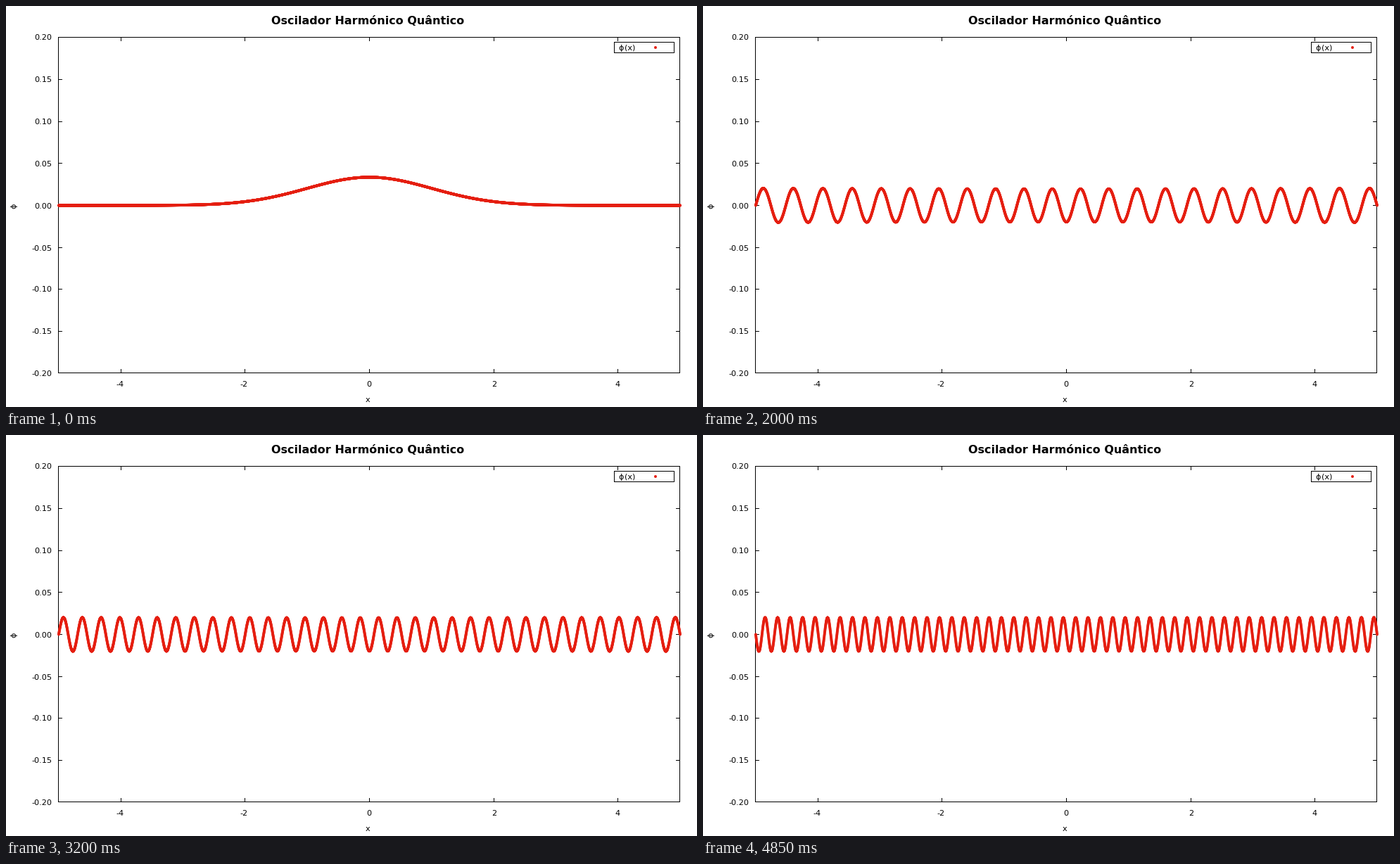
These frames come from a looping animation (982x570 px, 4900 ms). A matplotlib script:

```python
import numpy as np
import matplotlib.pyplot as plt
from matplotlib.animation import FuncAnimation
from matplotlib.patches import Rectangle

W, H, DPI = 982, 570, 64
LEFT, RIGHT, TOP, BOTTOM = 74.95, 957.95, 44.95, 521.95
FRAMES, STEP_MS = 98, 50
RED = (229, 30, 16)
DOT_RADIUS = 1.95
X_MAX, Y_MAX = 5, 0.2


def to_px(x):
    return LEFT + (RIGHT - LEFT) * (x + X_MAX) / (2 * X_MAX)


def to_py(y):
    return BOTTOM - (BOTTOM - TOP) * (y + Y_MAX) / (2 * Y_MAX)


def oscillator_states(points=5001, basis=180):
    """Eigenstates of the harmonic oscillator between hard walls."""
    x = np.linspace(-X_MAX, X_MAX, points)
    dx = x[1] - x[0]
    k = np.arange(1, basis + 1) * np.pi / (2 * X_MAX)
    sines = np.sin(np.outer(k, x + X_MAX)) / np.sqrt(X_MAX)
    energy = np.diag(k**2 / 2) + (sines * x**2 / 2) @ sines.T * dx
    _, vectors = np.linalg.eigh(energy)
    phi = vectors.T @ sines * np.sqrt(dx)
    # Start every state upwards at the left wall, using the slope there.
    phi *= np.sign(vectors.T @ k)[:, None]
    return x, phi


x, phi = oscillator_states()
px = to_px(x)

fig = plt.figure(figsize=(W / DPI, H / DPI), dpi=DPI, facecolor="white")
ax = fig.add_axes([0, 0, 1, 1])
ax.set_xlim(0, W)
ax.set_ylim(H, 0)
ax.axis("off")


def bar(x0, y0, w, h):
    ax.add_patch(Rectangle((x0, y0), w, h, fc="black", lw=0, antialiased=False))


def outline(x0, y0, x1, y1):
    for y in (y0, y1):
        bar(x0, y, x1 - x0 + 1, 1)
    for xx in (x0, x1):
        bar(xx, y0, 1, y1 - y0 + 1)


def label(x0, y0, text, size=11.2, ha="center", va="baseline", **kw):
    ax.text(x0, y0, text, fontsize=size * 72 / DPI, family="DejaVu Sans",
            ha=ha, va=va, color="black", **kw)


left, right, top, bottom = (int(v) for v in (LEFT, RIGHT, TOP, BOTTOM))
outline(left, top, right, bottom)
for v in range(-4, 5, 2):
    tx = int(to_px(v))
    bar(tx, top, 1, 6)
    bar(tx, bottom - 5, 1, 6)
    label(tx + (-0.5 if v < 0 else 0.3), 541, str(v))
for i in range(-4, 5):
    v = i * 0.05
    ty = int(to_py(v))
    bar(left, ty, 6, 1)
    bar(right - 5, ty, 6, 1)
    label(65, ty + 4.5, f"{v:.2f}", ha="right")

label(514.5, 26, "Oscilador Harmónico Quântico", 16, weight="bold")
label(513.7, 563, "x")
label(11, 284, "ϕ", va="center", rotation=90)

outline(864, 51, 949, 66)
label(874, 63, "ϕ")
label(879.5, 63, "(x)", ha="left")


def dots_alpha(cx, cy):
    """Opacity left by smooth-edged dots painted one over another."""
    ix, iy = np.floor(cx).astype(int), np.floor(cy).astype(int)
    clear = np.zeros(W * H)
    reach = range(-3, 4)
    for dx in reach:
        for dy in reach:
            dist = np.hypot(ix + dx + 0.5 - cx, iy + dy + 0.5 - cy)
            cover = np.clip(DOT_RADIUS + 0.5 - dist, 0, 0.9999)
            cell = (iy + dy) * W + ix + dx
            clear += np.bincount(cell, np.log1p(-cover), W * H)
    return 1 - np.exp(clear.reshape(H, W))


def curve_layer(n):
    canvas = np.empty((H, W, 4), np.uint8)
    canvas[..., :3] = RED
    sign = -1 if n > 91 else 1
    cx = np.append(px, 923.0)
    cy = np.append(to_py(sign * phi[n]), 59.0)
    canvas[..., 3] = np.round(255 * dots_alpha(cx, cy))
    return canvas


layer = fig.figimage(curve_layer(0), 0, 0, origin="upper", zorder=3)


def update(i):
    # The sequence leaves out two states part-way through.
    layer.set_data(curve_layer(i if i < 40 else i + 2))
    return (layer,)


anim = FuncAnimation(fig, update, frames=FRAMES, interval=STEP_MS,
                     repeat=True, repeat_delay=0, blit=False)
plt.show()
```
